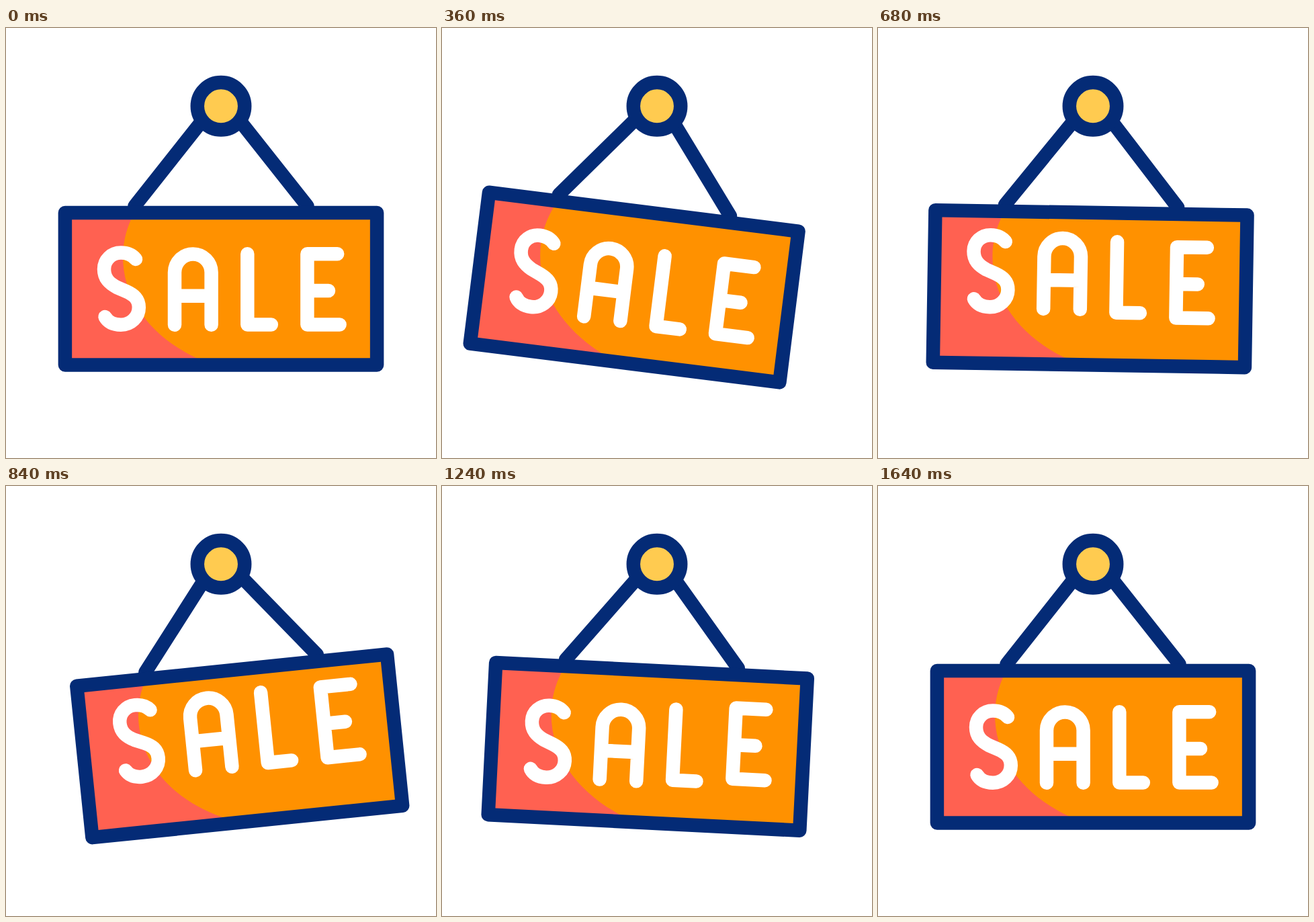
These frames come from a looping animation (640 px wide and 640 px high, 1.68 s). An HTML page:

```html
<!DOCTYPE html>
<html lang="en">
<head>
<meta charset="utf-8">
<title>Swinging sale sign</title>
<style>
html, body { margin: 0; width: 100%; height: 100%; overflow: hidden; background: #fff; }
svg { display: block; width: 100%; height: 100%; }
.line { fill: none; stroke-width: 20.5; stroke-linecap: round; stroke-linejoin: round; }
.navy { stroke: #042b76; }
.white { stroke: #fff; }
</style>
</head>
<body>
<svg viewBox="0 0 640 640" role="img" aria-label="Sale">
  <g id="sign">
    <path class="line navy" d="M191.5 265L306 120.4M448.5 265L334 120.4"/>
    <rect x="88" y="275" width="464" height="226.4" fill="#ff9100"/>
    <path fill="#ff6151" d="M88 275H191L186 285C178 303 174 322 174 340C174 405 216 459 283 491L304 501H88Z"/>
    <rect class="line navy" x="87.9" y="274.9" width="464.2" height="226.6"/>
    <g class="line white">
      <path class="letter" d="M193 344C188 338 180 334.6 171 334.6C157 334.6 146 345 146 359C146 373 154 380 165 386L179 392C190 397 197.8 403 197.8 416C197.8 430 186 441.7 171 441.7C160 441.7 152 438 147.5 430"/>
      <path class="letter" d="M251 441.8V363.8A27.3 27.3 0 0 1 305.6 363.8V441.8M251 398.7H305.6"/>
      <path class="letter" d="M359.3 336.2V441.6H394.8"/>
      <path class="letter" d="M493.2 336.2H448.4V441.6H496.6M448.4 391H480"/>
    </g>
  </g>
  <circle cx="320" cy="116.3" r="35.2" fill="#ffcb50" stroke="#042b76" stroke-width="20.5"/>
</svg>
<script>
const LOOP = 1680;
const sign = document.getElementById('sign');
const letters = [...document.querySelectorAll('.letter')];

// Swing keys: time, angle, ease strength on the way there
const swing = [[40, 0, 0], [480, 8, .57], [880, -6, .58], [1280, 3, .58], [1640, 0, .42]];

// cubic-bezier(k, 0, 1 - k, 1)
function ease(p, k) {
  if (p <= 0) return 0;
  if (p >= 1) return 1;
  let lo = 0, hi = 1;
  for (let i = 0; i < 24; i++) {
    const s = (lo + hi) / 2, r = 1 - s;
    const x = 3 * k * s * r * r + 3 * (1 - k) * s * s * r + s * s * s;
    if (x < p) lo = s; else hi = s;
  }
  return lo * lo * (3 - 2 * lo);
}

function angleAt(t) {
  let angle = 0;
  for (let i = 1; i < swing.length; i++) {
    const [t0, a0] = swing[i - 1], [t1, a1, k] = swing[i];
    angle += (a1 - a0) * ease((t - t0) / (t1 - t0), k);
  }
  return angle;
}

// Each letter rises, rests briefly and sinks, 80 ms after its neighbour
function liftAt(t, i) {
  const away = Math.abs(t - (720 + 80 * i));
  return -24 * (1 - ease((away - 40) / 480, .42));
}

function draw(t) {
  sign.setAttribute('transform', `rotate(${angleAt(t).toFixed(3)} 320 116.3)`);
  letters.forEach((el, i) => el.setAttribute('transform', `translate(0 ${liftAt(t, i).toFixed(3)})`));
}

const start = performance.now();
function tick() {
  draw((performance.now() - start) % LOOP);
  requestAnimationFrame(tick);
}
draw(0);
requestAnimationFrame(tick);
</script>
</body>
</html>
```
